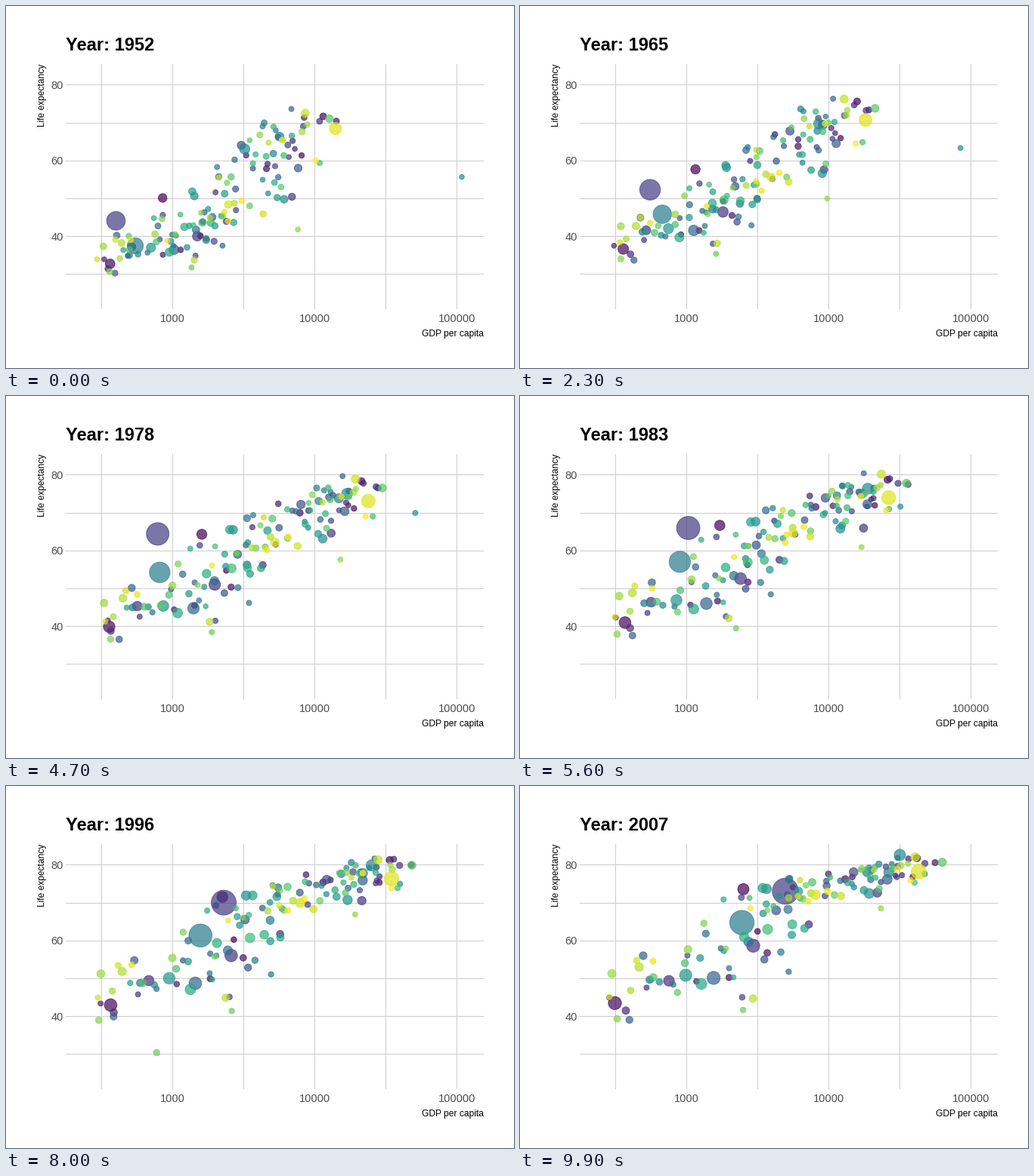
A matplotlib script for the animation above (10000 ms loop, 672 by 480 pixels).

```python
import numpy as np
import matplotlib.pyplot as plt
from matplotlib.animation import FuncAnimation

W, H, DPI = 672, 480, 96
LEFT, RIGHT, TOP, BOTTOM = 79, 632, 77, 402
FRAMES, COUNT = 100, 142
START, END = 1952, 2007
NODES = np.arange(START, END + 1, 5)
U = np.linspace(0, 1, len(NODES))
MAX_POP = 1319

plt.rcParams["font.family"] = "Liberation Sans"

# Landmark bubbles: colour rank, population (millions) at start and end,
# and a few (year, income, life expectancy) points.
LANDMARKS = [
    (25, 556, 1319, [(1952, 400, 44), (1962, 488, 44.5), (1967, 613, 58.4),
                     (1977, 741, 64), (1992, 1656, 68.7), (2007, 4959, 73)]),
    (59, 372, 1110, [(1952, 547, 37.4), (1967, 701, 47.2),
                     (1982, 856, 56.6), (2007, 2452, 64.7)]),
    (67, 86, 127, [(1952, 3217, 63), (1972, 14779, 73.4),
                   (2007, 31656, 82.6)]),
    (72, 0.2, 2.5, [(1952, 108382, 55.6), (1967, 80895, 64.6),
                    (1972, 109348, 67.7), (1982, 31354, 71.3),
                    (2007, 47307, 77.6)]),
    (108, 2.5, 8.9, [(1952, 493, 40), (1982, 882, 46.2),
                     (1992, 737, 23.6), (2007, 863, 46.2)]),
    (135, 158, 301, [(1952, 13990, 68.4), (2007, 42952, 78.2)]),
]

# Poor, middle and rich groups: share, population growth, then start and end
# of mean log income, its spread, mean life expectancy and its spread.
GROUPS = [
    (0.36, 2.9, (2.95, 3.15), (0.23, 0.36), (38.5, 54), (4, 7.5)),
    (0.38, 2.7, (3.38, 3.85), (0.27, 0.30), (50, 73), (7, 3)),
    (0.26, 1.4, (3.77, 4.42), (0.19, 0.18), (66, 78.8), (3.8, 1.8)),
]


def ramp(ends, power=1.0):
    """Ease-out from start to end over the nodes."""
    a, b = ends
    return a + (b - a) * (1 - (1 - U) ** power)


def landmark(p0, p1, points):
    years, income, life = zip(*points)
    return (np.interp(NODES, years, np.log10(income)),
            np.interp(NODES, years, life), ramp((p0, p1)))


def bubble(rng, growth, gx, sx, gy, sy):
    """A random member of a group, drifting with it and wavering a little."""
    zx = np.clip(rng.normal(), -1.9, 1.9)
    zy = np.clip(0.45 * zx + 0.89 * rng.normal(), -2, 1.9)
    x = ramp(gx, 1.4) + zx * ramp(sx) + rng.normal(0, 0.03, len(U))
    y = ramp(gy, 1.5) + zy * ramp(sy) + rng.normal(0, 0.4, len(U))
    p0 = np.clip(rng.lognormal(1.4, 1.5), 0.06, 70)
    return x, np.minimum(y, 82.2), ramp((p0, p0 * growth))


def build_world():
    """Log income, life expectancy and marker size per bubble and node."""
    rng = np.random.default_rng(12)
    world = {rank: landmark(*rest) for rank, *rest in LANDMARKS}
    shares = [g[0] for g in GROUPS]
    for rank in range(1, COUNT + 1):
        if rank not in world:
            group = GROUPS[rng.choice(len(GROUPS), p=shares)]
            world[rank] = bubble(rng, *group[1:])
    x, y, pop = np.array([world[r] for r in sorted(world)]).swapaxes(0, 1)
    return x, y, 2 + 10 * np.sqrt(pop / MAX_POP)


def px_text(x, y, s, **kw):
    return fig.text(x / W, 1 - y / H, s, va="baseline", **kw)


fig = plt.figure(figsize=(W / DPI, H / DPI), dpi=DPI, facecolor="white")
ax = fig.add_axes([LEFT / W, 1 - BOTTOM / H,
                   (RIGHT - LEFT) / W, (BOTTOM - TOP) / H])
ax.axis("off")
ax.set_xlim(2.2487, 5.189)
ax.set_ylim(20.622, 85.467)

for gx in np.arange(2.5, 5.1, 0.5):
    ax.axvline(gx, color="#cccccc", lw=0.75, zorder=0)
for gy in range(30, 81, 10):
    ax.axhline(gy, color="#cccccc", lw=0.75, zorder=0)

tick = dict(fontsize=11, color="#4d4d4d")
for k in (3, 4, 5):
    px_text(220.4 + (k - 3) * 188, 419, str(10 ** k), ha="center", **tick)
for v in (40, 60, 80):
    px_text(75.5, 110.3 + (80 - v) * 5.01, str(v), ha="right", **tick)

px_text(RIGHT, 438, "GDP per capita", ha="right", fontsize=9)
px_text(51, TOP, "Life expectancy", ha="right", fontsize=9,
        rotation=90, rotation_mode="anchor")
title = px_text(LEFT, 59, "", fontsize=17.7, fontweight="bold")

X, Y, SIZE = build_world()
colors = plt.cm.viridis(np.linspace(0, 1, COUNT), alpha=0.7)
dots = ax.scatter(X[:, 0], Y[:, 0], c=colors, edgecolors=colors,
                  linewidths=0.7, zorder=2, clip_on=False)


def update(i):
    t = i / (FRAMES - 1) * (len(NODES) - 1)
    k = min(int(t), len(NODES) - 2)
    f = t - k
    x, y, size = (a[:, k] * (1 - f) + a[:, k + 1] * f for a in (X, Y, SIZE))
    dots.set_offsets(np.column_stack([x, y]))
    dots.set_sizes((0.75 * (size * 2.845 + 0.5)) ** 2)
    title.set_text(f"Year: {round(START + (END - START) * i / (FRAMES - 1))}")
    return dots, title


anim = FuncAnimation(fig, update, frames=FRAMES, interval=100,
                     repeat=True, repeat_delay=0, blit=False)
plt.show()
```
